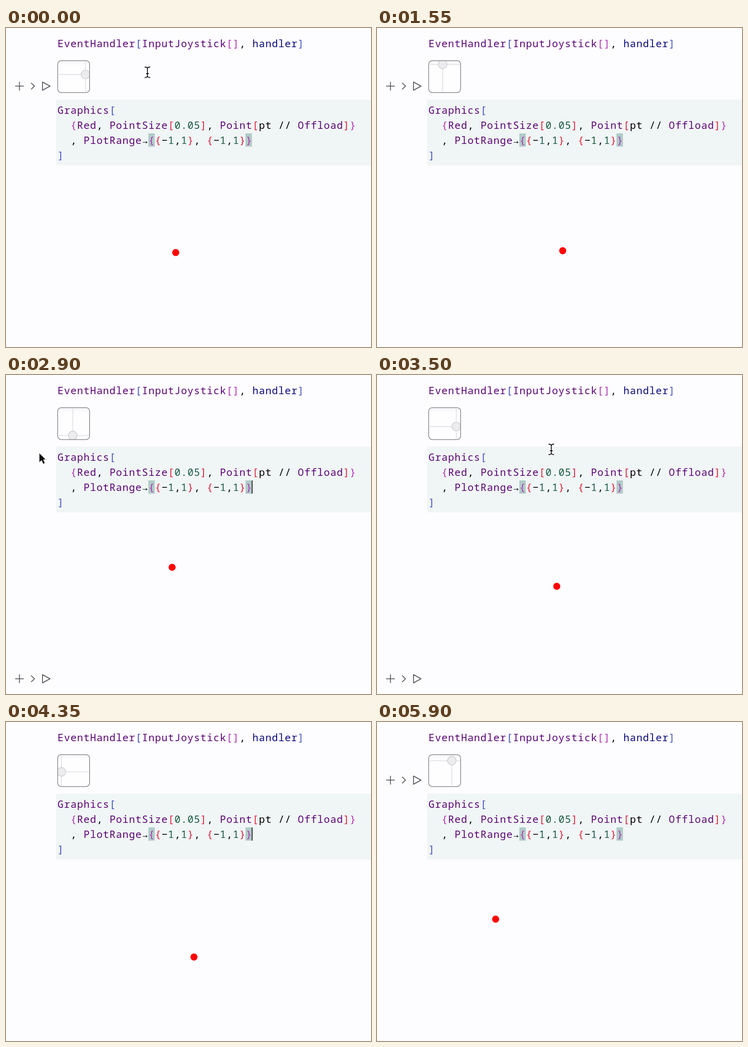
Write an HTML page that moves like this. It is 800x699 px and loops after 5950 ms.

```html
<!DOCTYPE html>
<html lang="en">
<head>
<meta charset="utf-8">
<title>Joystick notebook</title>
<style>
  html, body { margin: 0; width: 100%; height: 100%; overflow: hidden; background: #fdfcff; }
  svg { display: block; width: 100%; height: 100%; }
  text { font: 22px "Noto Sans Mono", "Liberation Mono", monospace; letter-spacing: 1.03px; white-space: pre; }
  .tools { fill: none; stroke: #55555a; stroke-width: 1.8; stroke-linejoin: round; }
  .axis { stroke: #dededf; stroke-width: 1.6; }
</style>
</head>
<body>
<svg viewBox="0 0 800 699">
  <defs>
    <clipPath id="padClip"><rect x="114" y="72" width="69" height="69" rx="7"/></clipPath>
    <linearGradient id="padFill" x2="0" y2="1">
      <stop offset="0" stop-color="#f3f3f5"/>
      <stop offset=".16" stop-color="#fefdff"/>
    </linearGradient>
    <path id="beamShape" d="M-6 -11.500Q0 -11.500 0 -8Q0 -11.500 6 -11.500M0 -8V8M-6 11.500Q0 11.500 0 8Q0 11.500 6 11.500M-3 3H3"/>
  </defs>
  <rect x="110" y="157" width="690" height="144" fill="#f0f5f5"/>
  <path d="M312 231h14v29h-14zM525 231h14v29h-14z" fill="#b0cbc7"/>
  <g id="code"></g>
  <path id="caret" d="M539.5 231v29" stroke="#000" stroke-width="1.6"/>

  <g clip-path="url(#padClip)">
    <rect x="113" y="71" width="71" height="71" fill="url(#padFill)"/>
    <path id="rowAxis" class="axis" d="M116 0H182"/>
    <path id="colAxis" class="axis" d="M0 74V139"/>
    <circle id="knob" r="9.5" fill="#ececee" stroke="#cbcbcd" stroke-width="1.4"/>
  </g>
  <rect x="113.3" y="71.5" width="70" height="70" rx="8" fill="none" stroke="#858588" stroke-width="1.5"/>

  <path id="tools" class="tools" d="M20 0H39M29.500 -9.500V9.500M55 -7l7.500 7l-7.500 7M80 -9V9L96.500 0Z"/>
  <circle id="dot" r="7.7" fill="#f00"/>

  <g id="beam" fill="none">
    <use href="#beamShape" stroke="#fff" stroke-width="3.5"/>
    <use href="#beamShape" stroke="#111" stroke-width="1.8"/>
  </g>
  <g id="arrow">
    <path d="M-.5 0V21L4.500 16.700L8.200 24.500L12.300 22.600L8.800 15H14.500Z" fill="#111" stroke="#fff" stroke-width="1"/>
  </g>
</svg>
<script>
const LOOP = 5950, STEP = 50;
const $ = id => document.getElementById(id);

// Code text, coloured by token kind and bracket depth
const CODE = `Graphics[
  {Red, PointSize[0.05], Point[pt // Offload]}
  , PlotRange→{{−1,1}, {−1,1}}
]`;
const BRACKETS = ['#4552c0', '#b231b4', '#e0213c'];
let depth = 0;

function colourOf(token) {
  if (/^[[{]/.test(token)) return BRACKETS[depth++ % 3];
  if (/^[\]}]/.test(token)) return BRACKETS[--depth % 3];
  if (/^[A-Z]/.test(token)) return '#5a0575';
  if (/^\d/.test(token)) return '#185a41';
  return token === 'handler' ? '#0b0b7c' : '#000';
}

function addLine(line, y) {
  const text = document.createElementNS('http://www.w3.org/2000/svg', 'text');
  text.setAttribute('x', 113);
  text.setAttribute('y', y);
  for (const token of line.match(/[A-Za-z]+|[\d.]+|[[\]{}]|[^\w[\]{}]+/g)) {
    const span = document.createElementNS(text.namespaceURI, 'tspan');
    span.textContent = token;
    span.setAttribute('fill', colourOf(token));
    text.append(span);
  }
  $('code').append(text);
}

addLine('EventHandler[InputJoystick[], handler]', 42);
CODE.split('\n').forEach((line, i) => addLine(line, 188 + 33.1 * i));

// Paths: time, x, y, heading in degrees
const DOT = [
  [0, 372, 492, -9], [650, 426, 529, 117], [1200, 388, 517, 275],
  [1550, 407, 488, 261], [2400, 387, 414, 219], [3500, 394, 463, 15],
  [4350, 412, 515, 173], [5400, 304, 462, 220], [5900, 260, 432, 307]
];
const SWEEPS = [
  [[0, 310, 97, 90], [650, 91, 165, 215], [1200, 31, 25, 280]],
  [[2250, 52, -22, 120], [2400, 18, 27, 108], [3500, 382, 163, 0], [4150, -20, 170, 190]]
];

// Hermite curve that leaves and enters each point along its heading
function travel(path, speed, t) {
  const i = Math.max(1, path.findIndex(key => key[0] >= t));
  const a = path[i - 1], b = path[i], span = b[0] - a[0], u = (t - a[0]) / span;
  const axis = (k, trig) => {
    const [m, w] = [a, b].map(key => speed * span * trig(key[3] * Math.PI / 180));
    const d = b[k] - a[k], c2 = 3 * d - 2 * m - w, c3 = m + w - 2 * d;
    return { at: a[k] + u * (m + u * (c2 + u * c3)), slope: m + u * (2 * c2 + 3 * u * c3) };
  };
  const x = axis(1, Math.cos), y = axis(2, Math.sin);
  return { x: x.at, y: y.at, heading: Math.atan2(y.slope, x.slope) };
}

const place = (id, x, y) => $(id).setAttribute('transform', `translate(${x} ${y})`);
const show = (id, on) => $(id).setAttribute('visibility', on ? 'visible' : 'hidden');

function draw(t) {
  const dot = travel(DOT, 0.11, t);
  place('dot', dot.x, dot.y);

  // The knob leans the way the dot is travelling
  const x = 148 + 26.6 * Math.cos(dot.heading), y = 106 + 26.6 * Math.sin(dot.heading);
  place('knob', x, y);
  place('rowAxis', 0, y);
  place('colAxis', x, 0);

  const blink = t % 1200;
  show('caret', blink >= 450 && blink < 1050);

  const sweep = SWEEPS.find(path => t >= path[0][0] && t <= path[path.length - 1][0]);
  const mouse = sweep ? travel(sweep, 0.6, t) : { x: 0, y: 0 };
  place('beam', mouse.x, mouse.y);
  place('arrow', mouse.x, mouse.y);
  show('beam', sweep && mouse.x > 110);
  show('arrow', sweep && mouse.x <= 110);

  // Cell tools follow the hovered cell and vanish when the mouse leaves to the left
  place('tools', 0, mouse.y > 150 ? 665.6 : 127.4);
  show('tools', t <= 4150 || t >= 4600);
}

const start = performance.now();
function tick() {
  const t = (performance.now() - start) % LOOP;
  draw(Math.floor(t / STEP) * STEP);
  requestAnimationFrame(tick);
}
tick();
</script>
</body>
</html>
```
